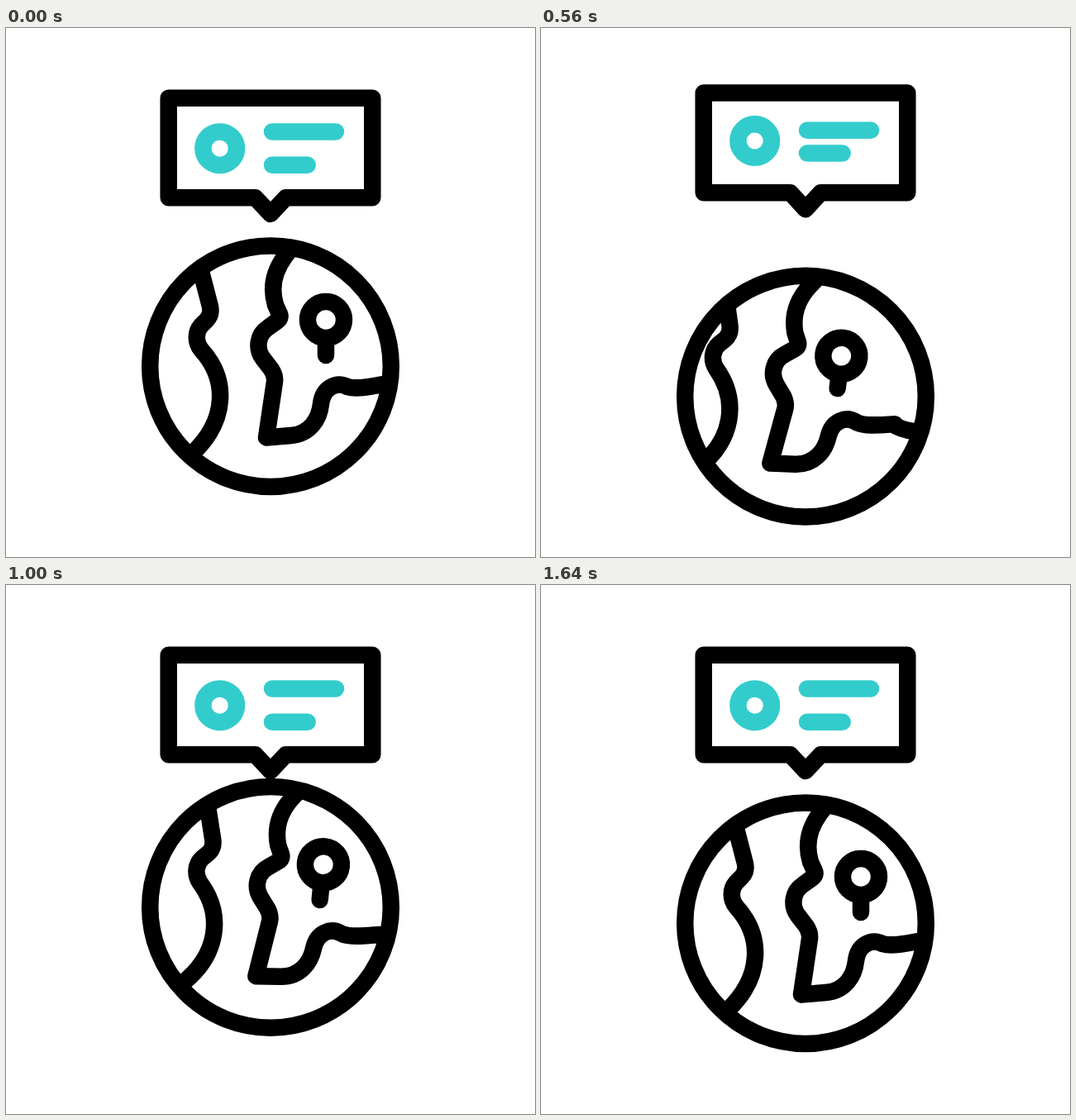
An HTML page that plays this animation: 640 px wide and 640 px high, repeating every 2 s.

```html
<!DOCTYPE html>
<html lang="en">
<head>
<meta charset="utf-8">
<title>Globe and location card</title>
<style>
  html, body { margin: 0; width: 100%; height: 100%; overflow: hidden; background: #fff; }
  svg { display: block; width: 100%; height: 100%; }
  svg * { stroke-linecap: round; stroke-linejoin: round; }
  .ink, .accent { fill: none; stroke: #000; stroke-width: 20.5; }
  .accent { stroke: #3cc; }
</style>
</head>
<body>
<svg viewBox="0 0 640 640">
  <defs><clipPath id="disc"><circle cx="320" cy="409.2" r="148"/></clipPath></defs>
  <g id="globe" class="ink">
    <g clip-path="url(#disc)">
      <g id="map">
        <path d="M226 256L247 337Q249 347 242.5 353.5L236 360C229 368 229 380 236 389C268 424 269 474 225 515L204 531"/>
        <path d="M364 241L337 277C324 295 320 315 326 335L331 346Q333 351 328 354.5L317 362.5C304 371 302 388 311 400L321 413Q326 421 325 428L315 495.5L345 493C368 491 379 473 381 455C383 436 399 427 413 434C425 438 445 433 459 430.5"/>
        <path d="M461 433C478 439 498 438 535 425"/>
        <g id="pin">
          <path d="M387 378V396"/>
          <circle id="ring" cx="387" cy="353" r="22" fill="#fff"/>
        </g>
      </g>
    </g>
    <circle cx="320" cy="409.2" r="145.8"/>
  </g>
  <path id="card" class="ink"/>
  <circle id="dot" class="accent" cx="258.7" cy="145.7" r="20.3"/>
  <path id="long" class="accent" d="M322 125.6H399"/>
  <path id="short" class="accent" d="M322 165.8H364.7"/>
</svg>
<script>
const LOOP = 2000, STEP = 40;
const $ = id => document.getElementById(id);
const linear = u => u;
const smooth = u => u * u * (3 - 2 * u);
const power = k => u => u ** k;
const easeOut = k => u => 1 - (1 - u) ** k;

// Keys are [time, value, easing into this key].
function track(t, ...keys) {
  if (t <= keys[0][0]) return keys[0][1];
  for (let i = 1; i < keys.length; i++) {
    const [t0, a] = keys[i - 1], [t1, b, ease = linear] = keys[i];
    if (t <= t1) return a + (b - a) * ease((t - t0) / (t1 - t0));
  }
  return keys[keys.length - 1][1];
}

const move = (id, x, y, extra = '') =>
  $(id).setAttribute('transform', `translate(${x} ${y})${extra}`);

// The card parts share timing and differ in how far they swing.
const swing = (t, down, up) => track(t, [80, 0], [400, down], [680, up], [910, 0]);

function draw(t) {
  const box = swing(t, 23, -28), tip = 225 + swing(t, 36, -37);
  const top = 84.7 + box, base = 205.3 + box;
  $('card').setAttribute('d',
    `M196.7 ${top}H443.3V${base}H338.5L320 ${tip}L301.5 ${base}H196.7Z`);
  move('dot', 0, swing(t, 34.5, -42));
  move('long', 0, swing(t, 46.5, -38));
  move('short', 0, swing(t, 34.5, -51));

  move('globe', 0, track(t, [320, 0], [680, 67, power(1.5)], [910, -22], [1640, 0]));
  const x = track(t, [320, 0], [760, -57.5, power(1.22)], [1200, 36.5, smooth], [1640, 0, smooth]);
  const y = track(t, [320, 0], [760, -14, power(2)], [1200, 0, easeOut(2.5)]);
  const turn = track(t, [320, 0], [760, 12.5], [1200, 0]);
  move('map', x, y, ` rotate(${turn} 320 409.2)`);
  move('pin', track(t, [320, 0], [800, -4], [1200, -4.5], [1640, 0, smooth]), 0);
  move('ring', 0, track(t, [320, 0], [400, 5], [880, 0]));
}

function tick() {
  const t = performance.now() % LOOP;
  draw(Math.floor(t / STEP) * STEP);
  requestAnimationFrame(tick);
}
tick();
</script>
</body>
</html>
```
